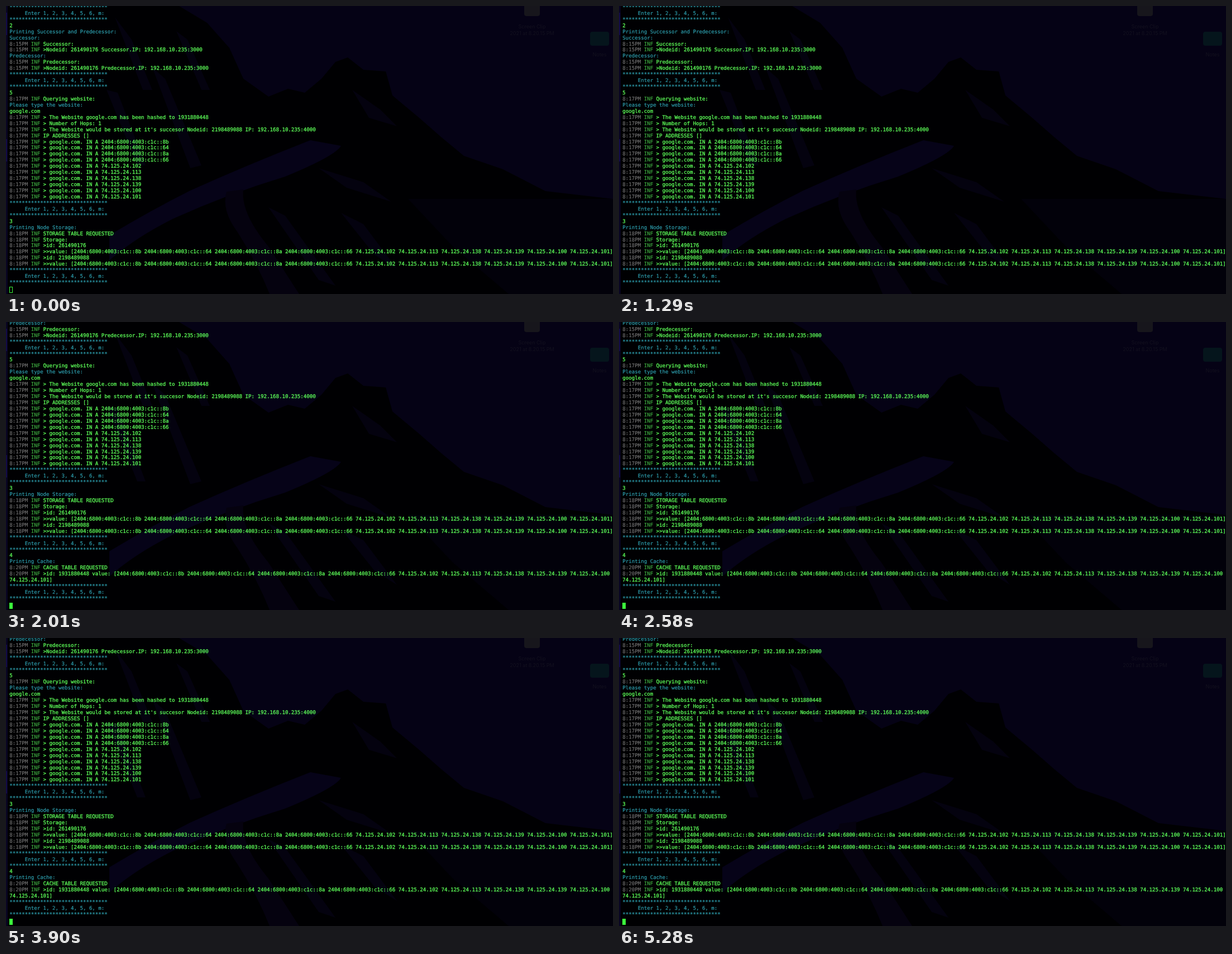
Animation of 1087x515 px, one loop 5.4 s. Source, as an HTML page with a canvas:

```html
<!DOCTYPE html>
<html lang="en">
<head>
<meta charset="utf-8">
<title>Terminal session</title>
<style>
  html, body { margin: 0; width: 100%; height: 100%; overflow: hidden; background: #000; }
  #wall { position: absolute; left: 0; top: 0; }
  #log {
    position: absolute; left: 6.3px; top: -2.1px;
    font: 9.115px/10.95px "DejaVu Sans Mono", monospace;
    text-rendering: geometricPrecision;
    -webkit-text-stroke: .32px;
    white-space: pre; color: #5cfc58;
  }
  #log div { height: 10.95px; }
  .cyan { color: #2fa4b4; -webkit-text-stroke-width: .15px; }
  .time { color: #777; -webkit-text-stroke-width: .1px; }
  .level { color: #3fae42; -webkit-text-stroke-width: .15px; }
  #cursor {
    position: absolute; left: 6px; top: 502px; width: 6px; height: 11px;
    box-sizing: border-box; border: 1px solid #3cf93c;
  }
</style>
</head>
<body>
<canvas id="wall" width="1087" height="515"></canvas>
<div id="log"></div>
<div id="cursor"></div>
<script>
const LOOP = 5400, ROW = 10.95, CELL = 5.488;
const TYPED_AT = 1980, PRINTED_AT = 2010;
const SCROLL_ROWS = 8, INPUT_ROW = 46;

// [start, cursor look]
const CURSOR = [
  [0, 'hollow'], [780, 'solid'], [1290, 'off'], [1590, 'solid'],
  [3030, 'off'], [3480, 'solid'], [3930, 'off'],
  [4380, 'solid'], [4830, 'off'], [5280, 'solid']
];

const span = (cls, text) => `<span class="${cls}">${text.replace(/>/g, '&gt;')}</span>`;
const cyan = text => span('cyan', text);
const info = (time, text) =>
  `${span('time', time)} ${span('level', 'INF')} ${text.replace(/>/g, '&gt;')}`;
const infos = (time, ...texts) => texts.map(text => info(time, text));

const stars = cyan('*'.repeat(32));
const menu = [stars, cyan('     Enter 1, 2, 3, 4, 5, 6, m:'), stars];

const v6 = ['8b', '64', '8a', '66'].map(end => '2404:6800:4003:c1c::' + end);
const v4 = [102, 113, 138, 139, 100, 101].map(end => '74.125.24.' + end);
const addresses = [...v6, ...v4];
const list = `[${addresses.join(' ')}]`;
const neighbour = name => [
  cyan(name + ':'),
  ...infos('8:15PM', name + ':', `>Nodeid: 261490176 ${name}.IP: 192.168.10.235:3000`)
];

const rows = [
  ...menu,
  '2',
  cyan('Printing Successor and Predecessor:'),
  ...neighbour('Successor'),
  ...neighbour('Predecessor'),
  ...menu,
  '5',
  info('8:17PM', 'Querying website:'),
  cyan('Please type the website:'),
  'google.com',
  ...infos('8:17PM',
    '> The Website google.com has been hashed to 1931880448',
    '> Number of Hops: 1',
    "> The Website would be stored at it's succesor Nodeid: 2198489088 IP: 192.168.10.235:4000",
    'IP ADDRESSES []',
    ...addresses.map(ip => '> google.com. IN A ' + ip)),
  ...menu,
  '3',
  cyan('Printing Node Storage:'),
  ...infos('8:18PM',
    'STORAGE TABLE REQUESTED', 'Storage:',
    '>id: 261490176', '>>value: ' + list,
    '>id: 2198489088', '>>value: ' + list),
  ...menu,
  '4',
  cyan('Printing Cache:'),
  ...infos('8:20PM',
    'CACHE TABLE REQUESTED',
    '>id: 1931880448 value: ' + list.slice(0, list.lastIndexOf(' '))),
  v4[5] + ']',
  ...menu
];

const log = document.getElementById('log');
const cursor = document.getElementById('cursor');
log.innerHTML = rows.map(row => `<div>${row}</div>`).join('');
const rowNodes = [...log.children];

function drawWall() {
  const ctx = document.getElementById('wall').getContext('2d');
  const shape = (color, path) => { ctx.fillStyle = color; ctx.fill(new Path2D(path)); };
  const label = (text, x, y) => ctx.fillText(text, x, y);

  ctx.fillStyle = '#050215';
  ctx.fillRect(0, 0, 1087, 515);

  // mountainside
  shape('#000002', 'M0 0H310L360 30 400 75 425 130 470 162 505 148 535 155 565 130 590 100' +
    ' 612 92 640 114 680 117 692 160 740 200 780 235 820 268 890 292 966 331 1087 345V515H0Z');
  shape('#04020f', 'M195 20L225 60 262 150 245 150Z M180 150L200 155 250 285 235 285Z' +
    ' M262 110L285 130 350 285 330 290Z M305 45L325 60 365 150 350 150Z' +
    ' M620 150L670 185 700 215 650 200Z M560 290L640 315 690 350 610 325Z' +
    ' M470 360L500 375 590 500 560 490Z M600 370L640 390 700 470 660 445Z');
  shape('#02010a', 'M720 345H1087V515H900L800 430Z');
  // road
  shape('#060318', 'M600 250Q590 268 500 305Q400 335 300 380Q230 415 185 455V410' +
    'Q260 365 330 330Q430 285 545 240Z');
  shape('#05020f', 'M395 332L425 328Q420 370 470 430L525 515H472Q450 460 415 405Q385 365 395 332Z');

  // edge of the window
  ctx.fillStyle = '#080522';
  ctx.fillRect(0, 0, 3, 515);
  ctx.fillStyle = '#120b48';
  ctx.fillRect(0, 12, 2, 40);
  ctx.fillRect(0, 238, 2, 40);
  ctx.fillStyle = '#000';
  ctx.fillRect(3, 0, 1, 515);

  // desktop icons behind the window
  ctx.fillStyle = '#17161c';
  ctx.beginPath();
  ctx.roundRect(928, -6, 28, 24, 4);
  ctx.fill();
  ctx.fillStyle = '#05151c';
  ctx.beginPath();
  ctx.roundRect(1046, 46, 34, 25, 4);
  ctx.fill();
  ctx.font = '9px Inter, sans-serif';
  ctx.textAlign = 'center';
  ctx.fillStyle = '#13111f';
  label('Screen Clip', 942, 40);
  label('2021 at 8.20.15 PM', 942, 52);
  label('Notes', 1063, 90);
}

function render(t) {
  const printed = t >= PRINTED_AT;
  const typed = t >= TYPED_AT;
  log.style.top = -2.1 - (printed ? SCROLL_ROWS * ROW : 0) + 'px';
  rowNodes.forEach((node, i) => {
    const shown = i < INPUT_ROW || printed || (typed && i === INPUT_ROW);
    node.style.visibility = shown ? 'visible' : 'hidden';
  });

  const look = CURSOR.filter(([start]) => t >= start).pop()[1];
  cursor.style.left = Math.round(6.3 + (typed && !printed ? CELL : 0)) + 'px';
  cursor.style.visibility = look === 'off' ? 'hidden' : 'visible';
  cursor.style.background = look === 'solid' ? '#3cf93c' : 'none';
}

drawWall();
const began = performance.now();
function tick() {
  render((performance.now() - began) % LOOP);
  requestAnimationFrame(tick);
}
tick();
</script>
</body>
</html>
```
